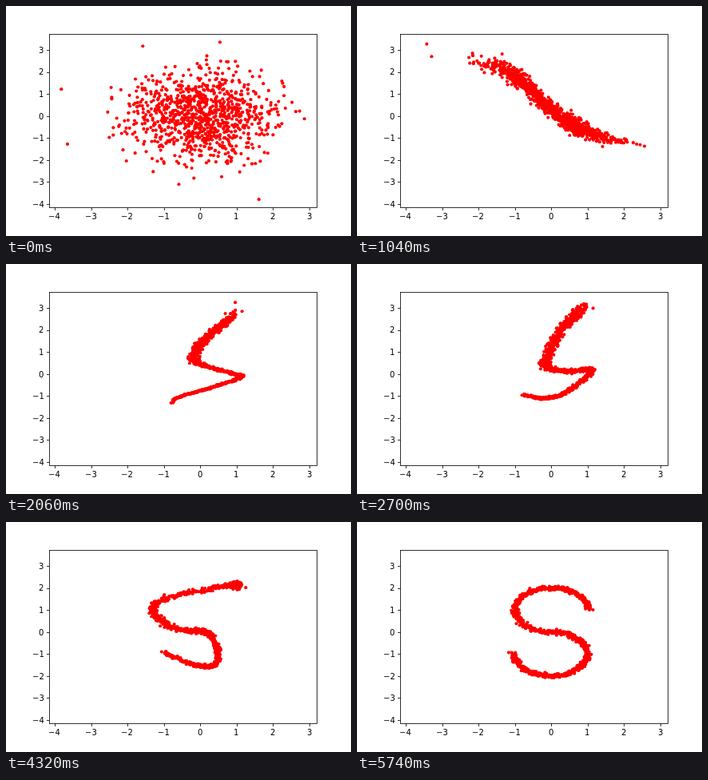
An HTML page with a canvas that plays this animation: 432 px wide and 288 px high, repeating every 5760 ms.

```html
<!DOCTYPE html>
<html lang="en">
<head>
<meta charset="utf-8">
<title>Gaussian cloud to S curve</title>
<style>
html, body { margin: 0; width: 100%; height: 100%; overflow: hidden; background: #fff; }
canvas { display: block; width: 432px; height: 288px; }
</style>
</head>
<body>
<canvas id="stage" width="432" height="288"></canvas>
<script>
const ctx = document.getElementById('stage').getContext('2d');
const COUNT = 1000, FRAME_MS = 20, FRAMES = 288, LAYER = 48;
const BOX = { l: 54.5, t: 35.5, r: 389.5, b: 252.5 };
const px = x => 243.3 + 45.57 * x;
const py = y => 137.7 - 27.5 * y;

// The few points that set the limits of the cloud
const extremes = [
  [-3.82, 1.22], [-3.65, -1.28], [-1.58, 3.18], [0.54, 3.36],
  [2.86, -0.13], [1.61, -3.8], [-0.59, -3.11]
];

// Smooth curve on 0..1 through evenly spaced values
function spline(...v) {
  const last = v.length - 1;
  const slope = i => {
    const a = Math.max(0, i - 1), b = Math.min(last, i + 1);
    return (v[b] - v[a]) / (b - a);
  };
  return r => {
    const i = Math.min(last - 1, Math.floor(r * last));
    const u = r * last - i, w = 1 - u;
    return w * w * (1 + 2 * u) * v[i] + u * u * (3 - 2 * u) * v[i + 1]
      + u * w * (w * slope(i) - u * slope(i + 1));
  };
}

// First layer: centre and spread of y at each x
const bend = x => 0.62 - (x < -0.25 ? 0.9 : 0.785) * Math.asinh(2 * (x + 0.25));
const spread = x => 0.09 + 0.12 / (1 + Math.exp(2.5 * (x - 1)));

// Middle layers: position along the strand, from its top end to its bottom end
const x1 = spline(0.84, 0.35, -0.03, -0.16, 0.47, 1.1, 0.45, -0.17, -0.75);
const y2 = spline(3.1, 2.28, 1, 0.28, 0.1, 0.25, -0.87, -1.18, -0.9);
const x2 = spline(1, 0.75, -1.18, -1.04, -0.2, 0.29, 0.49, 0, -0.97);

let seed = 20;
function random() {
  seed = (seed + 0x6D2B79F5) | 0;
  let n = Math.imul(seed ^ (seed >>> 15), seed | 1);
  n ^= n + Math.imul(n ^ (n >>> 7), n | 61);
  return ((n ^ (n >>> 14)) >>> 0) / 4294967296;
}
const normal = () =>
  Math.sqrt(-2 * Math.log(1 - random())) * Math.cos(2 * Math.PI * random());

function makePoints() {
  const cloud = extremes.slice();
  while (cloud.length < COUNT) {
    const x = normal(), y = normal();
    if (Math.hypot(x, y) < 2.9) cloud.push([x, y]);
  }
  const pts = cloud.map(([x, y]) => ({ x: [x], y: [y, bend(x) + spread(x) * y] }));
  pts.sort((a, b) => b.y[1] - a.y[1]);

  pts.forEach((p, i) => {
    const r = (i + 0.5) / COUNT, a = 3 * Math.PI * (r - 0.5);
    const n = p.y[0], e = normal();
    p.x[1] = x1(r) + n * (0.015 + 0.085 * (1 - r));
    p.y[2] = y2(r) + e * (0.025 + 0.05 * (1 - r) + Math.max(0, 0.1 - r));
    p.x[2] = x2(r) + n * (0.025 + 0.055 * (1 - r));
    p.y[3] = Math.sign(a) * (Math.cos(a) - 1) + e * 0.05;
    p.x[3] = Math.sin(a) + n * 0.045;
  });
  return pts;
}
const points = makePoints();

// Each step takes one layer, then rests for one while the other axis moves
function at(steps, progress) {
  const k = Math.max(0, Math.floor(progress / 2));
  const u = Math.min(1, Math.max(0, progress - 2 * k));
  return steps[k] + (steps[k + 1] - steps[k]) * u;
}

// Puts the ink of a label on whole pixels; share is the part left of x
function drawLabel(text, x, y, share) {
  const m = ctx.measureText(text);
  const ink = m.actualBoundingBoxLeft + m.actualBoundingBoxRight;
  ctx.fillText(text, Math.round(x - ink * share) + m.actualBoundingBoxLeft, y);
}

function drawAxes() {
  ctx.strokeStyle = ctx.fillStyle = '#000';
  ctx.lineWidth = 0.8;
  ctx.strokeRect(BOX.l, BOX.t, BOX.r - BOX.l, BOX.b - BOX.t);
  ctx.font = '10px "DejaVu Sans", sans-serif';
  ctx.textAlign = 'left';
  ctx.beginPath();
  for (let v = -4; v <= 3; v++) {
    const label = String(v).replace('-', '\u2212');
    const x = Math.round(px(v)) + 0.5, y = Math.round(py(v)) + 0.5;
    ctx.moveTo(x, BOX.b);
    ctx.lineTo(x, BOX.b + 3.5);
    ctx.moveTo(BOX.l, y);
    ctx.lineTo(BOX.l - 3.5, y);
    drawLabel(label, px(v), 267, 0.5);
    drawLabel(label, 47, Math.round(py(v) + 3.8), 1);
  }
  ctx.stroke();
}

function draw(frame) {
  const progress = frame / LAYER;
  ctx.fillStyle = '#fff';
  ctx.fillRect(0, 0, 432, 288);
  ctx.save();
  ctx.beginPath();
  ctx.rect(BOX.l, BOX.t, BOX.r - BOX.l, BOX.b - BOX.t);
  ctx.clip();
  ctx.fillStyle = '#f00';
  for (const p of points) {
    ctx.beginPath();
    ctx.arc(px(at(p.x, progress - 1)), py(at(p.y, progress)), 2.08, 0, 2 * Math.PI);
    ctx.fill();
  }
  ctx.restore();
  drawAxes();
}

const start = performance.now();
function tick() {
  const ms = Math.max(0, performance.now() - start);
  draw(Math.floor(ms / FRAME_MS) % FRAMES);
  requestAnimationFrame(tick);
}
tick();
</script>
</body>
</html>
```
